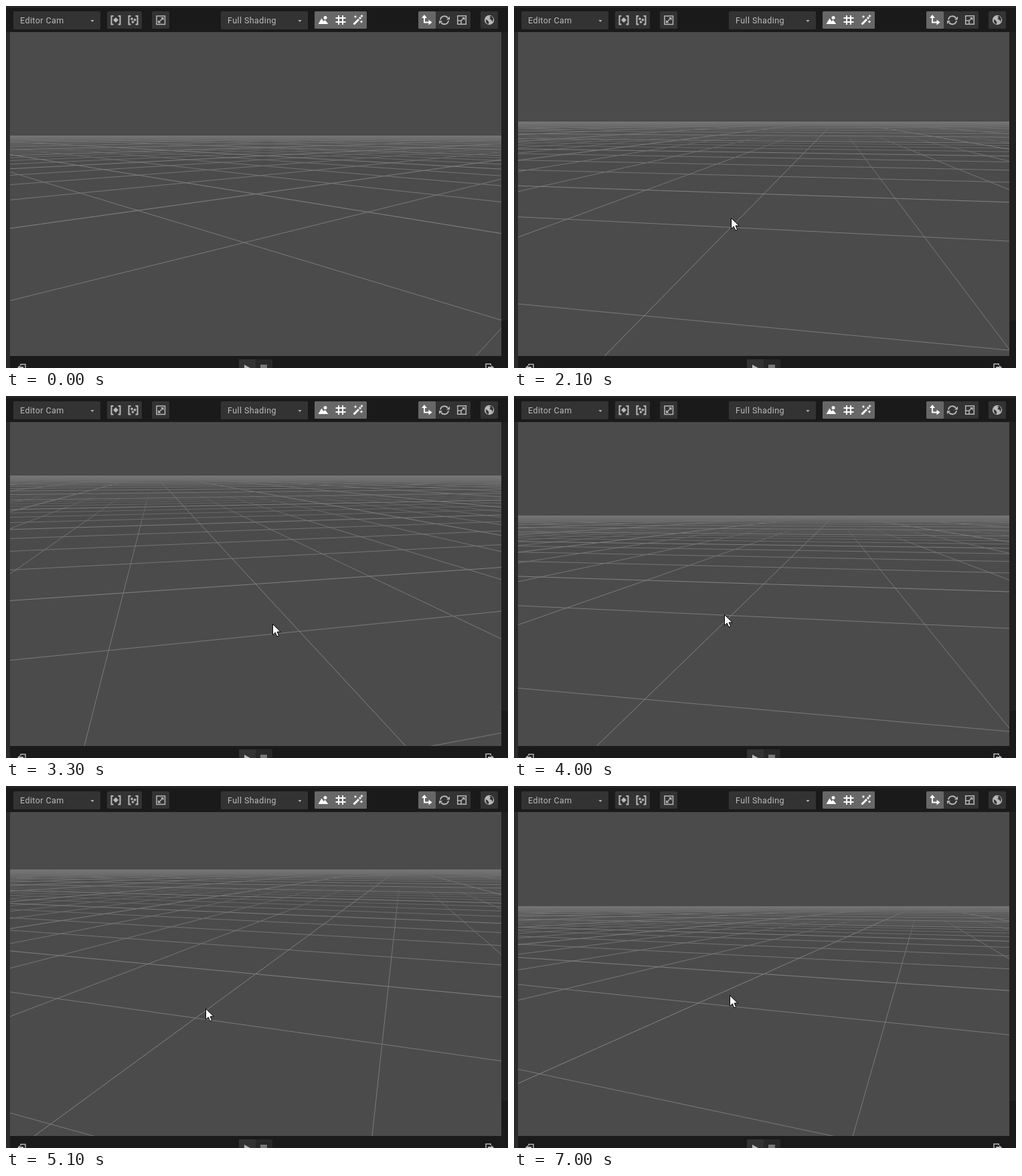
Animation of 750 by 542 pixels, one loop 7100 ms. Source, as an HTML page with a canvas:

```html
<!DOCTYPE html>
<html lang="en">
<head>
<meta charset="utf-8">
<title>Editor viewport</title>
<style>
  html, body { margin: 0; width: 100%; height: 100%; overflow: hidden; background: #1c1c1c; }
  canvas, svg { position: absolute; left: 0; top: 0; display: block; }
  text { font: 12.5px Roboto, sans-serif; letter-spacing: .42px; fill: #bcbcbc; }
  .btn { fill: #333; }
  .on { fill: #676767; }
  .line { fill: none; stroke: #b8b8b8; stroke-width: 2; }
  .thin { stroke-width: 1.5; }
  .thick { stroke-width: 3; }
  .solid { fill: #b8b8b8; }
  .lit { stroke: #fff; }
  .white { fill: #fff; }
</style>
</head>
<body>
<canvas id="view" width="750" height="542"></canvas>
<svg width="750" height="542" viewBox="0 0 750 542">
  <rect width="750" height="3" fill="#242424"/>
  <rect y="39" width="6" height="503" fill="#2b2b2b"/>
  <rect x="740" y="39" width="10" height="432" fill="#212121"/>

  <g class="btn">
    <rect x="11" y="8" width="130" height="27" rx="1.5"/>
    <rect x="151" y="8" width="52" height="26" rx="1.5"/>
    <rect x="218" y="8" width="26" height="26" rx="1.5"/>
    <rect x="321" y="8" width="130" height="27" rx="1.5"/>
    <rect x="616" y="8" width="78" height="26" rx="1.5"/>
    <rect x="709" y="8" width="26" height="26" rx="1.5"/>
    <rect x="348" y="529" width="25" height="13"/>
    <rect x="373" y="529" width="25" height="13" fill="#282828"/>
  </g>
  <rect class="on" x="461" y="8" width="78" height="26" rx="1.5"/>
  <rect class="on" x="616" y="8" width="26" height="26" rx="1.5"/>

  <text x="21" y="26">Editor Cam</text>
  <text x="331" y="26">Full Shading</text>
  <path class="solid" d="M126.5 21h5l-2.5 3zM436.5 21h5l-2.5 3z"/>

  <!-- frame selection, frame all, maximise -->
  <path class="line" d="M160.5 15h-3v12.5h3M167.5 15h3v12.5h-3M186.5 15h-3v12.5h3M193.5 15h3v12.5h-3"/>
  <path class="solid" d="M164 17l4 4-4 4-4-4zM188 17l2.2 2.2-2.2 2.2-2.2-2.2zM192.5 18.5l2.2 2.2-2.2 2.2-2.2-2.2zM189.500 21.8l2.2 2.2-2.2 2.2-2.2-2.2z"/>
  <rect class="line thin" x="225" y="15" width="12.5" height="12.5"/>
  <path class="solid" d="M231 17h4.5v4.5zM227 21v4.5h4.5z"/>
  <path class="line thin" d="M234 18.5l-5.5 5.5"/>

  <!-- scenery, grid, effects -->
  <path class="white" d="M466.5 27l5-8.5 3 4.5 2-2.3 5 6.3z"/>
  <circle class="white" cx="477" cy="17.5" r="2.5"/>
  <path class="line lit" d="M497 14v14M503 14v14M492.5 18h15M492.5 24h15"/>
  <path class="line lit thick" d="M519.5 27.5l7.500-7.500M528 19l2-2"/>
  <path class="white" d="M522 13.500l.8 1.7 1.7.8-1.7.8-.8 1.7-.8-1.7-1.7-.8 1.7-.8zM531.500 12.500l.8 1.7 1.7.8-1.7.8-.8 1.7-.8-1.7-1.7-.8 1.7-.8zM531 21l.8 1.7 1.7.8-1.7.8-.8 1.7-.8-1.7-1.7-.8 1.7-.8z"/>

  <!-- move, rotate, scale, world -->
  <path class="line lit" d="M625 17v7.5h7"/>
  <path class="white" d="M621 18l4-5 4 5zM631.5 20.5l5 4-5 4z"/>
  <path class="line" d="M649 20.5a6 6 0 0 1 11-2.5M661 22a6 6 0 0 1-11 2.5"/>
  <path class="solid" d="M658 20.5h5v-5zM652 22h-5v5z"/>
  <path class="line thin" d="M674.700 14.700h12.600v12.600h-12.600zM674.700 22h5.300v5.300M680 22l4-4"/>
  <path class="solid" d="M681 17h4.500v4.500z"/>
  <circle class="solid" cx="722" cy="21" r="7.2"/>
  <path fill="#333" d="M716.5 20l3 1.500 2 3-1 3-3-2.5zM722 15.5l2 1.5-1.5 2.5 3 1.5 1.5 3 1-5-2.5-4z"/>

  <!-- bottom bar -->
  <path class="solid" d="M356 537l9 5h-9z"/>
  <rect x="380" y="537" width="10" height="5" fill="#777"/>
  <path class="line thin" d="M22 538.5v-2h7v6M717 542v-6h7v2"/>
  <path class="solid" d="M17 541l4-3v2h5v2h-8zM729 541l-4-3v2h-5v2h8z"/>

  <path id="cursor" fill="#fff" stroke="#000" d="M.5.5v16.2l3.800-3.600 2.600 6 2.800-1.200-2.600-5.900h5.200z"/>
</svg>
<script>
const LOOP = 7100, STEP = 100;
const VIEW = { x: 6, y: 39, w: 734, h: 485 };
const CX = VIEW.x + VIEW.w / 2, CY = VIEW.y + VIEW.h / 2;
const FOCAL = VIEW.h / 2 / Math.tan(Math.PI / 8);
const CELL = 0.322;   // cell size; the orbit distance is 1
const EXTENT = 240;   // cells from the centre to the edge
const MAJOR = 4;
const NEAR = 0.03, FAR = 52;

// Ends of the drag strokes: horizon height above the centre, yaw in degrees, pointer
const pose = (time, rise, yaw, x, y) => ({ time, rise, yaw, x, y });
const drag = [
  pose(800, 89, 43, 502, 309),
  pose(2100, 110.5, -10.3, 324, 317),
  pose(2800, 201.8, 28.7, 449, 350),
  pose(4000, 104, -10.2, 314, 327),
  pose(4500, 218.5, -1.65, 384, 352),
  pose(5700, 100.5, -37.8, 211, 314),
  pose(7000, 103.5, -21.3, 322, 313)
];

const ctx = document.getElementById('view').getContext('2d');
const cursor = document.getElementById('cursor');

const mix = (a, b, u) => a + (b - a) * u;
const smooth = u => u * u * (3 - 2 * u);

function poseAt(t) {
  const next = Math.max(1, drag.findIndex(p => p.time >= t));
  const a = drag[next - 1], b = drag[next];
  const u = smooth(Math.max(0, (t - a.time) / (b.time - a.time)));
  const at = key => mix(a[key], b[key], u);
  // The pointer comes in from below before the first stroke
  const enter = 1 - smooth(Math.min(1, t / drag[0].time));
  return { rise: at('rise'), yaw: at('yaw'), x: at('x') + 70 * enter, y: at('y') + 250 * enter };
}

// Grey that changes with depth; stops are [depth, level]
function depthGrey(rise, stops) {
  const top = CY - rise, close = 0.8;
  const g = ctx.createLinearGradient(0, top, 0, top + rise / close);
  for (const [z, v] of stops) g.addColorStop(close / z, `rgb(${v},${v},${v})`);
  return g;
}

function drawGrid(rise, yaw) {
  const pitch = Math.atan(rise / FOCAL), sp = Math.sin(pitch), cp = Math.cos(pitch);
  const sy = Math.sin(yaw), cy = Math.cos(yaw), end = EXTENT * CELL;

  // Ground point to camera space: right, up, depth
  const toCam = (a, b) => {
    const t = a * sy + b * cy;
    return [a * cy - b * sy, t * sp, 1 + t * cp];
  };
  const clip = (p, q) => {
    if (p[2] >= NEAR) return p;
    const k = (NEAR - p[2]) / (q[2] - p[2]);
    return p.map((v, i) => mix(v, q[i], k));
  };
  const screen = ([x, y, z]) => [CX + FOCAL * x / z, CY - FOCAL * y / z];
  const addLine = (p, q) => {
    if (p[2] < NEAR && q[2] < NEAR) return;
    ctx.moveTo(...screen(clip(p, q)));
    ctx.lineTo(...screen(clip(q, p)));
  };
  const strokeLines = (limit, wanted, style) => {
    ctx.beginPath();
    for (let n = -limit; n <= limit; n++) {
      if (!wanted(n)) continue;
      const o = n * CELL;
      addLine(toCam(-end, o), toCam(end, o));
      addLine(toCam(o, -end), toCam(o, end));
    }
    ctx.strokeStyle = style;
    ctx.stroke();
  };

  ctx.beginPath();
  ctx.rect(VIEW.x, CY - rise + rise / FAR, VIEW.w, VIEW.h);
  ctx.clip();
  ctx.lineWidth = 1;
  strokeLines(32, n => n % MAJOR !== 0, depthGrey(rise, [[8, 75], [4, 96], [2, 114], [.8, 122]]));
  strokeLines(EXTENT, n => n % MAJOR === 0, depthGrey(rise, [[FAR, 118], [14, 108], [4, 122], [.8, 131]]));
}

function draw(t) {
  const { rise, yaw, x, y } = poseAt(t);
  ctx.fillStyle = '#1a1a1a';
  ctx.fillRect(0, 0, 750, 542);
  ctx.save();
  ctx.beginPath();
  ctx.rect(VIEW.x, VIEW.y, VIEW.w, VIEW.h);
  ctx.clip();
  ctx.fillStyle = '#4b4b4b';
  ctx.fillRect(VIEW.x, VIEW.y, VIEW.w, VIEW.h);
  drawGrid(rise, yaw * Math.PI / 180);
  ctx.restore();
  cursor.setAttribute('transform', `translate(${Math.round(x)} ${Math.round(y)})`);
}

const start = performance.now();
let shown = -1;
function tick() {
  const t = Math.floor((performance.now() - start) % LOOP / STEP) * STEP;
  if (t !== shown) draw(shown = t);
  requestAnimationFrame(tick);
}
tick();
</script>
</body>
</html>
```
